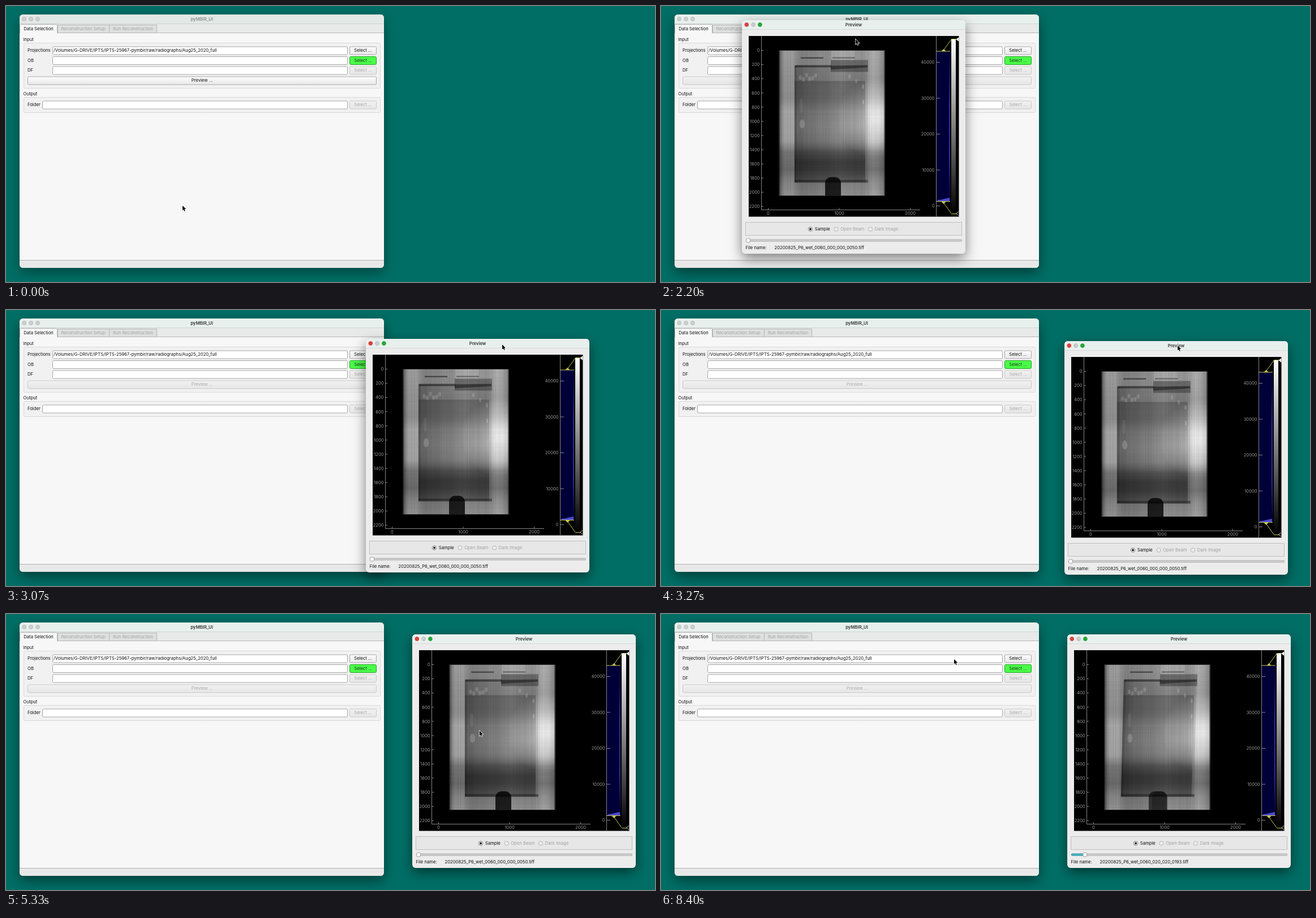
Write an HTML page with a canvas that moves like this. It is 1147 px wide and 488 px high and loops after 8470 ms.

```html
<!DOCTYPE html>
<html>
<head>
<meta charset="utf-8">
<style>
html, body { margin: 0; width: 100%; height: 100%; overflow: hidden; background: #006e65; }
canvas { display: block; }
</style>
</head>
<body>
<canvas id="stage" width="1147" height="488"></canvas>
<script>
const c = document.getElementById('stage').getContext('2d');
const LOOP = 8470, FPS = 15, LAG = 67;
const GRAB = { x: 200, y: 8 };

// Pointer stops: time, x, y
const POINTER = [
  [0, 312, 353], [870, 380, 133], [2070, 380, 133], [2200, 344, 59], [2330, 343, 33],
  [3200, 913, 63], [3400, 913, 63], [3800, 918, 44], [4950, 918, 44], [5800, 728, 425],
  [6000, 727, 425], [6530, 742, 425], [6870, 773, 425], [7070, 779, 424], [7930, 779, 424],
  [8400, 518, 80]
];

function pointerAt(t) {
  const i = POINTER.findIndex(k => k[0] > t);
  if (i < 0) return { x: 518, y: 80 };
  const [t0, x0, y0] = POINTER[i - 1], [t1, x1, y1] = POINTER[i];
  const u = (t - t0) / (t1 - t0), e = u * u * (3 - 2 * u);
  return { x: x0 + (x1 - x0) * e, y: y0 + (y1 - y0) * e };
}

function rect(x, y, w, h, fill) {
  c.fillStyle = fill;
  c.fillRect(x, y, w, h);
}

function box(x, y, w, h, r, fill, stroke) {
  c.beginPath();
  c.roundRect(x + .5, y + .5, w - 1, h - 1, r);
  c.fillStyle = fill;
  c.fill();
  if (stroke) { c.strokeStyle = stroke; c.lineWidth = 1; c.stroke(); }
}

function text(s, x, y, color = '#111', align = 'left', weight = 400, size = 7.7) {
  c.font = `${weight} ${size}px Inter, sans-serif`;
  c.textAlign = align;
  c.textBaseline = 'alphabetic';
  c.fillStyle = color;
  c.fillText(s, x, y + 2.8);
}

function line(color, ...pts) {
  c.beginPath();
  for (let i = 0; i < pts.length; i += 2) c.lineTo(pts[i], pts[i + 1]);
  c.strokeStyle = color;
  c.lineWidth = 1;
  c.stroke();
}

function shape(color, ...pts) {
  c.beginPath();
  for (let i = 0; i < pts.length; i += 2) c.lineTo(pts[i], pts[i + 1]);
  c.fillStyle = color;
  c.fill();
}

function ellipse(x, y, rx, ry, fill, stroke) {
  c.beginPath();
  c.ellipse(x, y, rx, ry, 0, 0, 7);
  if (fill) { c.fillStyle = fill; c.fill(); }
  if (stroke) { c.strokeStyle = stroke; c.lineWidth = 1; c.stroke(); }
}

function gradient(x0, y0, x1, y1, ...stops) {
  const g = c.createLinearGradient(x0, y0, x1, y1);
  for (let i = 0; i < stops.length; i += 2) g.addColorStop(stops[i], stops[i + 1]);
  return g;
}

const black = a => `rgba(0,0,0,${a})`;
const white = a => `rgba(255,255,255,${a})`;

function frameWindow(w, h, body, bar, title, titleColor, lit, shadow) {
  c.save();
  c.shadowColor = black(shadow);
  c.shadowBlur = 22;
  c.shadowOffsetY = 8;
  c.beginPath();
  c.roundRect(0, 0, w, h, 6);
  c.fillStyle = body;
  c.fill();
  c.restore();
  c.beginPath();
  c.roundRect(0, 0, w, 17, [6, 6, 0, 0]);
  c.fillStyle = bar;
  c.fill();
  const lights = lit ? ['#d9433f', '#cdcfce', '#25a636'] : Array(3).fill('#cdd1d0');
  lights.forEach((f, i) => ellipse(8.3 + i * 11.8, 8, 3.4, 3.4, f, lit && i !== 1 ? f : '#b5b9b8'));
  text(title, w / 2, 8, titleColor, 'center', 600);
}

function button(x, y, w, label, state) {
  const [fill, edge, ink] = {
    on: [gradient(0, y, 0, y + 14, 0, '#fdfdfd', 1, '#e9e9e9'), '#a9a9a9', '#111'],
    off: [gradient(0, y, 0, y + 14, 0, '#f2f2f2', 1, '#e6e6e6'), '#c9c9c9', '#aaa'],
    go: ['#4bfb49', '#1aa51a', '#123812']
  }[state];
  box(x, y, w, 15, 2, fill, edge);
  text(label, x + w / 2, y + 7, ink, 'center');
}

function fieldRow(label, x, y, value, state) {
  text(label, 38, y + 7);
  box(x, y, 604 - x, 15, 2, '#fff', '#a6a6a6');
  text(value, x + 2, y + 7);
  button(607, y, 48, 'Select ...', state);
}

function mainWindow(t) {
  const active = t >= 1190, opened = t >= 1520;
  c.save();
  c.translate(24, 15);
  frameWindow(644, 448, '#f7f7f7', active ? '#e8f0ee' : '#e1e8e6', 'pyMBIR_UI',
    active ? '#333' : '#8b8f8e', active && !opened, active ? .45 : .35);
  c.restore();

  rect(24, 31, 644, 16, '#e8e9e9');
  line('#cfd2d1', 24, 31.5, 668, 31.5);
  line('#b5b5b5', 24, 47.5, 668, 47.5);
  box(91, 33, 92, 15, 0, '#dedfdf', '#b5b5b5');
  box(182, 33, 85, 15, 0, '#dedfdf', '#b5b5b5');
  box(24, 32, 67, 17, 1, '#f7f7f7', '#b5b5b5');
  rect(25, 47, 65, 3, '#f7f7f7');
  text('Data Selection', 57.5, 40, '#111', 'center');
  text('Reconstruction Setup', 136.5, 40.5, '#a2a2a2', 'center');
  text('Run Reconstruction', 224.5, 40.5, '#a2a2a2', 'center');

  text('Input', 30.5, 59);
  box(31, 65, 631, 81, 1, '#f1f1f1', '#d9d9d9');
  fieldRow('Projections', 82, 71.5, '/Volumes/G-DRIVE/IPTS/IPTS-25967-pymbir/raw/radiographs/Aug25_2020_full', 'on');
  fieldRow('OB', 82, 89, '', 'go');
  fieldRow('DF', 82, 106.5, '', 'off');
  button(38, 124.5, 617, 'Preview ...', opened ? 'off' : 'on');
  text('Output', 30.5, 155.5);
  box(31, 161, 631, 28, 1, '#f1f1f1', '#d9d9d9');
  fieldRow('Folder', 64, 167.5, '', 'off');

  c.beginPath();
  c.roundRect(24, 449, 644, 14, [0, 0, 6, 6]);
  c.fillStyle = '#e8e8e8';
  c.fill();
  line('#b0b0b0', 24, 449.5, 668, 449.5);
}

// Radiograph in a 188 x 257 box; turn 0..1 swings the sample slightly.
function radiograph(turn) {
  c.save();
  c.translate(65, 53.5);
  c.beginPath();
  c.rect(0, 0, 188, 257);
  c.clip();
  rect(0, 0, 188, 257, gradient(0, 0, 0, 257, 0, '#b4b4b4', .15, '#aaa', .33, '#a2a2a2', .42, '#bebebe',
    .62, '#bababa', .7, '#868686', .82, '#787878', .9, '#959595', 1, '#a8a8a8'));
  rect(0, 0, 188, 257, gradient(0, 0, 188, 0, 0, black(.5), .05, black(.12), .13, black(.12), .2, black(.28),
    .45, black(.2), .6, black(.12), .8, black(.16), .9, black(0), 1, black(.22)));
  const glow = c.createRadialGradient(172, 120, 4, 172, 120, 70);
  glow.addColorStop(0, white(.75));
  glow.addColorStop(1, white(0));
  rect(0, 0, 188, 257, glow);

  c.save();
  c.transform(1, 0, -5 * turn / 206, 1, 7.5 * turn, 0);
  rect(93, 0, 42, 17, white(.13));
  rect(28, 27, 129, 206, gradient(28, 0, 157, 0, 0, black(.3), .15, black(.15), .6, black(.07), .85, black(.14), 1, black(.1)));
  rect(28, 54, 125, 179, gradient(0, 54, 0, 233, 0, black(.2), .25, black(.12), .45, black(.03), .66, black(.12), .8, black(.38), 1, black(.22)));
  rect(28, 27, 4, 206, black(.15));
  rect(29, 26, 64, 4, black(.45));
  rect(92, 17, 66, 21, black(.3));
  shape(black(.4), 92, 27, 157, 26, 157, 30, 92, 34);
  rect(39, 12, 40, 2.5, black(.45));
  rect(95, 12, 40, 2, black(.4));
  rect(28, 229, 130, 5, black(.35));
  ellipse(41.5, 130, 4.5, 8, white(.18));
  ellipse(40, 98, 3.5, 13, white(.07));
  for (let i = 0; i < 6; i++) ellipse(38 + i * 5.5, 48 + 4 * Math.sin(i * 2.3), 2.8, 4, white(.15));
  for (let i = 0; i < 3; i++) ellipse(125 + i * 12, 46 + i * 9, 2, 4, white(.17));
  rect(148, 88, 3, 7, white(.22));
  c.restore();

  const lean = 3 * turn;
  c.beginPath();
  c.roundRect(82 - lean, 224, 28 + lean * 1.6, 45, [11, 11, 0, 0]);
  c.fillStyle = black(.72 - .12 * turn);
  c.fill();
  c.beginPath();
  c.roundRect(82 + lean, 224, 28 - lean, 45, [11, 11, 0, 0]);
  c.fillStyle = black(.25);
  c.fill();

  // Faint detector streaks
  for (let x = 0; x < 188; x += 2) rect(x, 0, 1, 257, black(.04 + .04 * Math.sin(x * x * 1.7)));
  for (let y = 0; y < 257; y += 3) rect(0, y, 188, 1, black(.02 + .02 * Math.sin(y * y * 2.3)));
  rect(0, 0, 2, 257, black(.5));
  rect(186, 0, 2, 257, black(.5));
  c.restore();
}

function axes() {
  const ink = '#858585', size = 7.6;
  line(ink, 34.5, 28, 34.5, 335.5, 315, 335.5);
  for (let i = 0; i < 12; i++) {
    const y = 53.5 + i * 25.08;
    line(ink, 34.5, y, 38, y);
    text(i * 200, 31.5, y, '#999', 'right', 400, size);
  }
  for (let i = 0; i < 3; i++) {
    const x = 46.5 + i * 125.5;
    line(ink, x, 335.5, x, 332);
    text(i * 1000, x, 341, '#999', 'center', 400, size);
  }
}

function histogram() {
  const yellow = '#c6c650';
  rect(343, 55, 25, 266, '#000039');
  shape('#4a4ad0', 345, 320, 346, 318, 352, 317.5, 358, 316, 367, 314, 367, 320);
  shape('#3c3cae', 367.5, 318, 366, 250, 366, 150, 367.5, 60);
  line('#858585', 343.5, 28, 343.5, 347);
  for (let i = 0; i < 5; i++) {
    const y = 328.5 - i * 63.5;
    line('#858585', 343.5, y, 350, y);
    text(i * 10000, 340.5, y, '#999', 'right', 400, 7.6);
  }
  line(yellow, 343, 55, 368, 55);
  line(yellow, 343, 320.5, 368, 320.5);
  shape(yellow, 352.5, 55, 356.5, 51, 360.5, 55);
  shape(yellow, 352.5, 321, 356.5, 325, 360.5, 321);
  line(yellow, 356.5, 53, 370.5, 33.5, 380, 33.5);
  line(yellow, 356.5, 323, 370.5, 342.5, 380, 342.5);
  rect(370, 34, 8, 308, gradient(0, 34, 0, 342, 0, '#fff', 1, '#000'));
  shape('#fff', 378.5, 34, 383.5, 30, 383.5, 38);
  line('#bbb', 383, 338.5, 378.5, 342, 383, 345.5);
}

function radio(x, label, on) {
  ellipse(x, 369.5, 3.7, 3.7, on ? '#fff' : '#ececec', on ? '#777' : '#b5b5b5');
  if (on) ellipse(x, 369.5, 1.9, 1.9, '#111');
  text(label, x + 7.7, 369.5, on ? '#111' : '#a2a2a2');
}

function previewWindow(t) {
  const held = pointerAt(Math.max(2330, Math.min(t - LAG, 3800)));
  const page = t < 7320 ? 0 : t < 7720 ? 1 : 2;
  c.save();
  c.translate(Math.round(held.x - GRAB.x), Math.round(held.y - GRAB.y));
  frameWindow(395, 413, '#ececec', '#e8f0ee', 'Preview', '#333', true, .5);
  line('#d6dad9', 0, 16.5, 395, 16.5);
  c.save();
  c.beginPath();
  c.rect(12, 28, 371.5, 319.5);
  c.clip();
  rect(12, 28, 372, 320, '#000');
  radiograph(page / 2);
  axes();
  histogram();
  c.restore();

  box(6, 357, 383, 24, 0, '#e7e7e7', '#bebebe');
  radio(121, 'Sample', true);
  radio(166.5, 'Open Beam');
  radio(227, 'Dark Image');

  const knob = 11 + page * 10.2;
  box(7, 387.5, 382, 4, 1, '#d4d4d4', '#a9a9a9');
  if (page) box(7, 387.5, knob - 7, 4, 1, '#45b9cf', '#3295a8');
  box(knob - 4, 385.5, 8, 8, 2, '#fafafa', '#a0a0a0');
  text('File name:', 6.5, 402.5);
  const tag = ['000_000_0050', '010_010_0122', '020_020_0193'][page];
  text(`20200825_P6_wet_0060_${tag}.tiff`, 57.5, 402.5);
  c.restore();
}

function pointer({ x, y }) {
  c.save();
  c.translate(x, y);
  c.beginPath();
  [0, 0, 0, 8.6, 2, 6.8, 3.4, 10, 4.8, 9.4, 3.4, 6.3, 6.1, 6.1].forEach((v, i, p) => i % 2 || c.lineTo(v, p[i + 1]));
  c.closePath();
  c.strokeStyle = '#fff';
  c.lineWidth = 1.4;
  c.stroke();
  c.fillStyle = '#000';
  c.fill();
  c.restore();
}

function draw() {
  const t = Math.floor((performance.now() % LOOP + 4) * FPS / 1000) * 1000 / FPS;
  rect(0, 0, 1147, 488, '#006e65');
  mainWindow(t);
  if (t >= 1520) previewWindow(t);
  pointer(pointerAt(t));
  requestAnimationFrame(draw);
}
draw();
</script>
</body>
</html>
```
